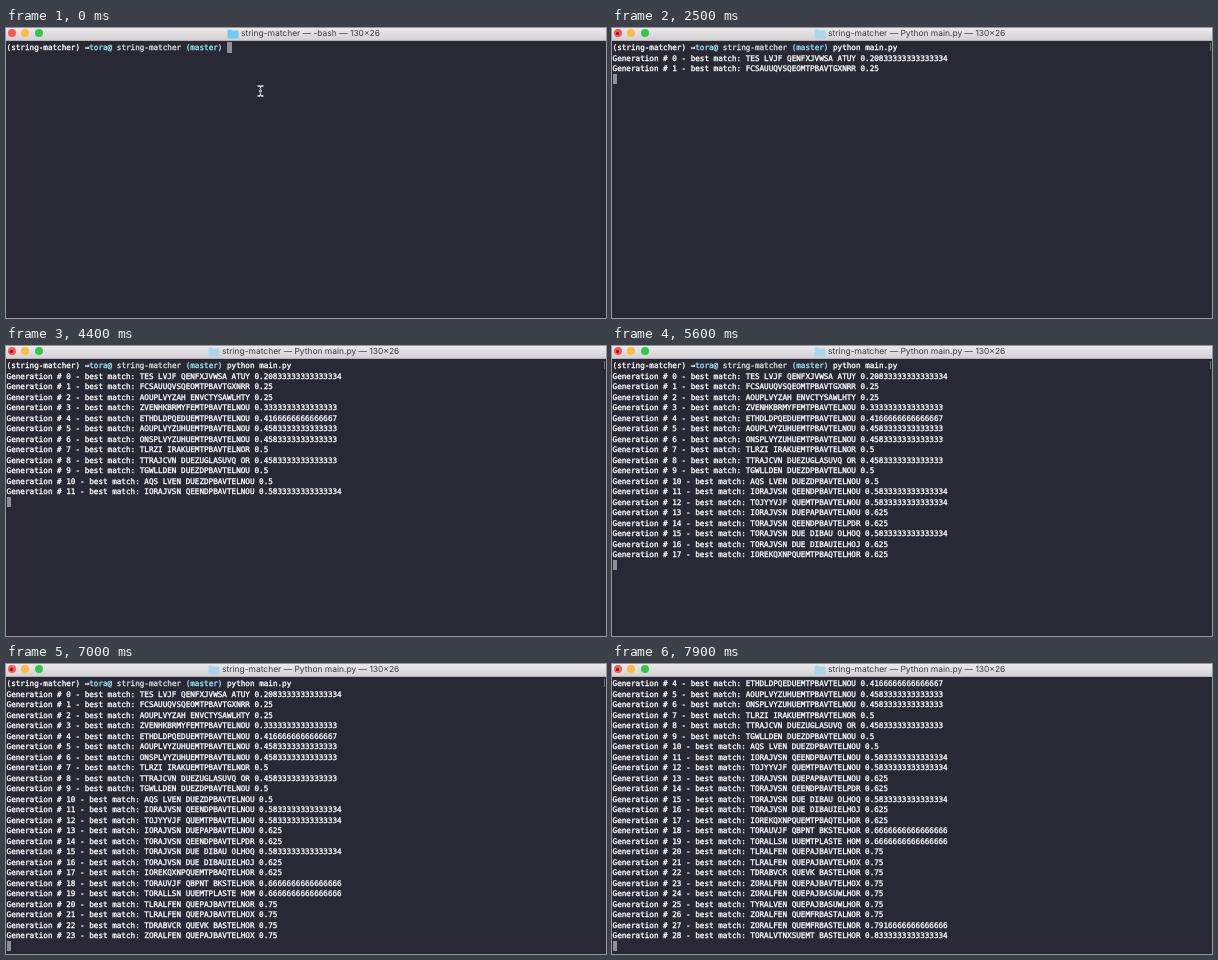
Write an HTML page that moves like this. It is 600 by 290 pixels and loops after 8 s.

```html
<!DOCTYPE html>
<html lang="en">
<head>
<meta charset="utf-8">
<title>Terminal</title>
<style>
html, body { margin: 0; width: 100%; height: 100%; overflow: hidden; background: #282935; }
#stage { position: relative; width: 600px; height: 290px; overflow: hidden; text-rendering: geometricPrecision; }
#bar { position: absolute; inset: 0 0 auto; height: 12px; background: linear-gradient(#ebe9eb, #d3d1d3); border-bottom: 1px solid #b4b2b5; }
#bar i { position: absolute; top: 1px; width: 8.4px; height: 8.4px; border-radius: 50%; }
#close::after { content: ""; position: absolute; inset: 2.7px; border-radius: 50%; background: #7a1512; opacity: var(--busy); }
#title { position: absolute; top: 0; line-height: 12px; font-size: 8.45px; font-family: Inter, Roboto, sans-serif; color: #3a3a3a; white-space: pre; }
#folder { position: absolute; top: 1px; }
pre { position: absolute; left: .6px; top: 15.3px; margin: 0; font: 7.64px/10.5px "DejaVu Sans Mono", monospace; color: #fff; -webkit-text-stroke: .32px; }
pre b { color: #9ae6f2; font-weight: 400; }
pre u { color: #dcdce0; text-decoration: none; }
#mark { position: absolute; left: 598px; top: 15px; width: 1px; height: 8px; background: #6a6b74; }
#cursor { position: absolute; width: 4.6px; height: 10.5px; background: #8f9095; }
#pointer { position: absolute; left: 250px; top: 57px; }
</style>
</head>
<body>
<div id="stage">
  <div id="bar">
    <i id="close" style="left:1.7px;background:#fc5753"></i>
    <i style="left:15.1px;background:#fdbc40"></i>
    <i style="left:28.5px;background:#34c84a"></i>
    <svg id="folder" width="12" height="10"><path d="M.5 1.5Q.5.5 1.5.5H4L5 1.5H10.5Q11.5 1.5 11.5 2.5V8.5Q11.5 9.5 10.5 9.5H1.5Q.5 9.5.5 8.5Z"/></svg>
    <span id="title"></span>
  </div>
  <pre id="text"></pre>
  <div id="mark"></div>
  <div id="cursor"></div>
  <svg id="pointer" width="9" height="12" fill="none"><path d="M1.5 1H3.5L4.5 2L5.5 1H7.5M4.5 2V10M1.5 11H3.5L4.5 10L5.5 11H7.5M3 6H6" stroke="#e4e4e8" stroke-width="1.3"/><path d="M4.5 3V9" stroke="#44454f" stroke-width=".5"/></svg>
</div>
<script>
const LOOP = 8000, ROWS = 26, COL = 4.6, ROW = 10.5, PROMPT_COLS = 48;
const COMMAND = "python main.py";
const PROMPT = "(string-matcher) →<b>tora@</b> <u>string-matcher</u> <b>(master)</b> ";

// Best candidate of each generation and how many of its 24 letters are right
const best = `TES LVJF QENFXJVWSA ATUY:5
FCSAUUQVSQEOMTPBAVTGXNRR:6
AOUPLVYZAH ENVCTYSAWLHTY:6
ZVENHKBRMYFEMTPBAVTELNOU:8
ETHDLDPQEDUEMTPBAVTELNOU:10
AOUPLVYZUHUEMTPBAVTELNOU:11
ONSPLVYZUHUEMTPBAVTELNOU:11
TLRZI IRAKUEMTPBAVTELNOR:12
TTRAJCVN DUEZUGLASUVQ OR:11
TGWLLDEN DUEZDPBAVTELNOU:12
AQS LVEN DUEZDPBAVTELNOU:12
IORAJVSN QEENDPBAVTELNOU:14
TOJYYVJF QUEMTPBAVTELNOU:14
IORAJVSN DUEPAPBAVTELNOU:15
TORAJVSN QEENDPBAVTELPDR:15
TORAJVSN DUE DIBAU OLHOQ:14
TORAJVSN DUE DIBAUIELHOJ:15
IOREKQXNPQUEMTPBAQTELHOR:15
TORAUVJF QBPNT BKSTELHOR:16
TORALLSN UUEMTPLASTE HOM:16
TLRALFEN QUEPAJBAVTELNOR:18
TLRALFEN QUEPAJBAVTELHOX:18
TDRABVCR QUEVK BASTELHOR:18
ZORALFEN QUEPAJBAVTELHOX:18
ZORALFEN QUEPAJBASUWLHOR:18
TYRALVEN QUEPAJBASUWLHOR:18
ZORALFEN QUEMFRBASTALNOR:18
ZORALFEN QUEMFRBASTELNOR:19
TORALVTNXSUEMT BASTELHOR:20`.split("\n").map((line, i) => {
  const [word, hits] = line.split(":");
  return `Generation # ${i} - best match: ${word} ${hits / 24}`;
});

const el = id => document.getElementById(id);
const show = (id, on) => el(id).style.visibility = on ? "visible" : "hidden";

function draw(t) {
  const typed = t >= 700, entered = t >= 1000, running = t >= 1200;
  // One generation every 200 ms, with a short hitch late in the run
  const count = Math.max(0, Math.floor((t - (t < 6500 ? 2000 : 2100)) / 200));
  const lines = [PROMPT + (typed ? COMMAND : ""), ...best.slice(0, count)];
  const scroll = Math.max(0, lines.length + 1 - ROWS);
  const html = lines.slice(scroll).join("\n");
  if (draw.last !== html) el("text").innerHTML = draw.last = html;

  const col = running ? 0 : PROMPT_COLS + (typed ? COMMAND.length : 0);
  const row = running ? lines.length - scroll : 0;
  el("cursor").style.left = .6 + col * COL + "px";
  el("cursor").style.top = 14.3 + row * ROW + "px";
  show("cursor", !entered || running);
  show("mark", entered && !scroll);
  show("pointer", !typed);

  el("title").textContent = `string-matcher — ${running ? "Python main.py" : "-bash"} — 130×26`;
  el("title").style.left = (running ? 216 : 235) + "px";
  el("folder").style.left = (running ? 202 : 221) + "px";
  el("folder").style.fill = running ? "#a9d6ea" : "#6fcaf0";
  el("close").style.setProperty("--busy", running ? 1 : 0);
}

function tick() {
  draw(performance.now() % LOOP);
  requestAnimationFrame(tick);
}
tick();
</script>
</body>
</html>
```
